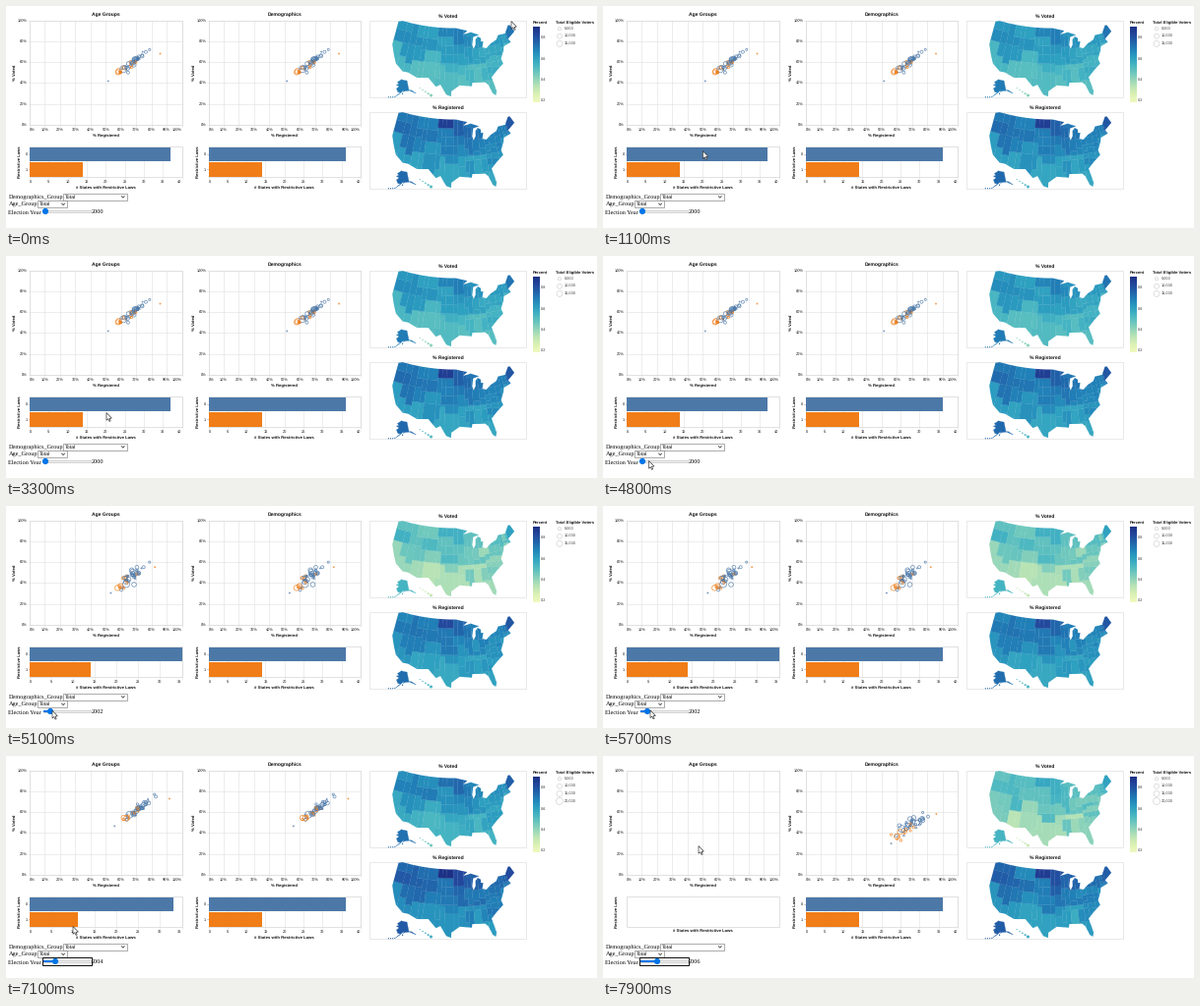
A matplotlib script that plays this animation: 600 px wide and 226 px high, repeating every 8 s.

```python
import numpy as np
import matplotlib.pyplot as plt
from matplotlib.animation import FuncAnimation
from matplotlib.collections import PolyCollection
from matplotlib.colors import LinearSegmentedColormap
from matplotlib.patches import Circle, Polygon, Rectangle
from matplotlib.path import Path

plt.rcParams["text.hinting"] = "none"
plt.rcParams["text.hinting_factor"] = 8

W, H, DPI = 600, 226, 64
PT = 72 / DPI
FRAMES, STEP = 80, 100
BLUE, ORANGE, GRID = "#4c78a8", "#f07d17", "#dddddd"
SANS, SERIF = "Liberation Sans", "Liberation Serif"

CMAP = LinearSegmentedColormap.from_list("ygb", [
    "#eff9bd", "#dbf1b4", "#bde5b5", "#94d5b9", "#69c5be", "#45b4c2",
    "#2c9ec0", "#2182b8", "#2163aa", "#23479c", "#1c3185"])
LOW, HIGH = 0.18, 0.90

# Map strips from west to east: western edge in degrees, then the states
# from south to north with the latitudes that part them.
STRIPS = [
    (125, "CA", 42, "OR", 46, "WA"),
    (120, "CA", 37.5, "NV", 42, "OR", 46, "WA"),
    (117, "CA", 35.5, "NV", 42, "ID"),
    (114, "AZ", 37, "UT", 42, "ID", 45, "MT"),
    (111, "AZ", 37, "UT", 41, "WY", 45, "MT"),
    (109, "NM", 37, "CO", 41, "WY", 45, "MT"),
    (104, "TX", 32, "NM", 37, "CO", 41, "NE", 43, "SD", 46, "ND"),
    (102, "TX", 36.5, "OK", 37, "KS", 40, "NE", 43, "SD", 46, "ND"),
    (100, "TX", 34, "OK", 37, "KS", 40, "NE", 43, "SD", 46, "ND"),
    (96.5, "TX", 34, "OK", 37, "KS", 40, "IA", 43.5, "MN"),
    (94.5, "LA", 33, "AR", 36.5, "MO", 40.5, "IA", 43.5, "MN"),
    (91.5, "LA", 31, "MS", 35, "AR", 36.5, "MO", 39, "IL", 42.5, "WI", 47, "MN"),
    (90, "MS", 35, "TN", 36.5, "KY", 37, "IL", 42.5, "WI", 46, "MI"),
    (88, "AL", 35, "TN", 36.5, "KY", 38, "IN", 41.8, "MI"),
    (85, "FL", 30.7, "GA", 35, "TN", 36.5, "KY", 38.8, "OH", 41.8, "MI"),
    (82.5, "FL", 30.7, "GA", 33, "SC", 35.2, "NC", 36.6, "VA", 37.5, "WV",
     39.5, "OH"),
    (80.5, "FL", 30.7, "SC", 34.8, "NC", 36.6, "VA", 38.5, "WV", 39.7, "PA",
     42, "NY"),
    (77.5, "NC", 36.6, "VA", 38.3, "MD", 39.7, "PA", 42, "NY"),
    (75, "NJ", 41, "NY"),
    (73.4, "CT", 42, "MA", 42.7, "VT"),
    (72, "RI", 42, "MA", 42.7, "NH"),
    (71, "MA", 42.9, "ME"),
]
STRICT = "ND GA FL TX AL IN SC TN VA LA SD MO CO AZ".split()

# Coast and border key points (degrees west, north), clockwise
NORTH = [122.8, 49, 95.2, 49, 89.6, 48, 92, 46.7, 88, 47.4, 84, 46.2, 87, 45.7,
         87.8, 43, 87.3, 41.7, 86.2, 43, 86, 44.8, 84.7, 45.7, 83.4, 45,
         83.6, 43.9, 82.5, 43.8, 83.3, 41.8, 81.5, 41.4, 79, 42.8, 76.3, 43.6,
         75, 45, 71.5, 45, 69.2, 47.4, 68.2, 47.3, 67, 44.8]
SOUTH = [70.8, 43, 70, 41.7, 73.6, 40.9, 74.1, 39.6, 76, 37, 75.5, 35.3,
         78, 33.9, 81.2, 31.5, 80.1, 26.5, 80.7, 25.2, 81.7, 26, 82.8, 29,
         84, 30.1, 89, 30.4, 89.3, 29.2, 94, 29.7, 97.2, 27.7, 97.3, 25.9,
         99.1, 26.5, 101.5, 29.8, 103.2, 29, 106.5, 31.8, 111, 31.3,
         114.8, 32.5, 117.1, 32.5, 120.6, 34.6, 122.4, 37.3, 124.3, 40.4,
         124.7, 48.4]
ALASKA = [141, 69.6, 141, 60.3, 136, 59.5, 130, 55.5, 139.5, 59.7, 148, 60,
          152, 59.2, 151, 61, 164.8, 54.6, 157.5, 58.7, 162, 58.7, 166, 62,
          161, 64.3, 168, 65.6, 162, 66.5, 166.5, 68.3, 156.5, 71.3]
SCALE, MAP_X, MAP_Y, MAP_GAP = 172, 454, 53.6, 93


def albers(points, mid, offset, lat0, p1, p2, scale, x0, y0):
    """Equal-area conic projection of (west, north) degrees to pixels."""
    p1, p2 = np.radians([p1, p2])
    n = (np.sin(p1) + np.sin(p2)) / 2
    c = np.cos(p1) ** 2 + 2 * n * np.sin(p1)

    def raw(dlon, lat):
        rho = np.sqrt(c - 2 * n * np.sin(np.radians(lat))) / n
        theta = n * np.radians(dlon)
        return rho * np.sin(theta), rho * np.cos(theta)

    points = np.asarray(points, float)
    x, y = raw(mid - points[:, 0], points[:, 1])
    cx, cy = raw(offset, lat0)
    return np.column_stack([x0 + scale * (x - cx), y0 + scale * (y - cy)])


def mainland(points):
    return albers(points, 96, -.6, 38.7, 29.5, 45.5, SCALE, MAP_X, MAP_Y)


def alaska(points):
    return albers(points, 154, -2, 58.5, 55, 65, .35 * SCALE,
                  MAP_X - .307 * SCALE, MAP_Y + .201 * SCALE)


def hawaii(points):
    return albers(points, 157, -3, 19.9, 8, 18, SCALE,
                  MAP_X - .205 * SCALE, MAP_Y + .212 * SCALE)


def dense(flat):
    """Closed outline with extra points on each edge, so it can curve."""
    p = np.reshape(flat, (-1, 2)).astype(float)
    return np.concatenate([a + (b - a) * np.linspace(0, 1, 7)[:-1, None]
                           for a, b in zip(p, np.roll(p, -1, axis=0))])


def blob(lon, lat, r):
    a = np.linspace(0, 2 * np.pi, 9)
    return np.column_stack([lon + 1.2 * r * np.cos(a), lat + r * np.sin(a)])


cells, owners = [], []
for strip, following in zip(STRIPS, STRIPS[1:] + [(66,)]):
    w, e = strip[0], following[0]
    edges = [24, *strip[2::2], 50]
    for name, s, n in zip(strip[1::2], edges, edges[1:]):
        cells.append((w, n, e, n, e, s, w, s))
        owners.append(name)
NAMES = sorted(set(owners)) + ["AK", "HI"]


def latitude(name):
    if name in ("AK", "HI"):
        return 48 if name == "AK" else 20
    return np.mean([np.clip([c[1], c[5]], 28, 49).mean()
                    for c, o in zip(cells, owners) if o == name])


# Survey figures: turnout rises with latitude, registration with turnout.
YEARS = [2000, 2002, 2004, 2006]
VOTE_MEAN = [.59, .455, .63, .465]
REG_MEAN = [.677, .665, .715, .685]
SCATTER = [.01, .026, .011, .03]
KEEN = {"ND": .04, "MN": .06, "ME": .04, "WI": .03}
SIZES = {"CA": 20, "TX": 13, "NY": 12, "FL": 11}

rng = np.random.default_rng(8)
COUNT = len(NAMES)
DEVIATION = (.008 * (np.array([latitude(n) for n in NAMES]) - 39.5)
             + rng.normal(0, .022, COUNT) + [KEEN.get(n, 0) for n in NAMES])
VOTERS = np.exp(rng.normal(.9, .7, COUNT)).clip(.4, 9)
VOTERS = np.array([SIZES.get(n, v) for n, v in zip(NAMES, VOTERS)])
VOTERS[[NAMES.index(n) for n in ("ND", "AK", "HI")]] = .5


def radius(millions):
    return .77 * np.sqrt(millions)


def survey(i):
    noise = np.random.default_rng(YEARS[i]).normal(0, 1, (2, COUNT))
    vote = VOTE_MEAN[i] + DEVIATION + noise[0] * SCATTER[i]
    reg = REG_MEAN[i] + .85 * DEVIATION + noise[1] * (.008 + SCATTER[i] / 2)
    reg[NAMES.index("ND")] += .1
    return vote, reg


fig = plt.figure(figsize=(W / DPI, H / DPI), dpi=DPI, facecolor="white")
ax = fig.add_axes([0, 0, 1, 1])
groups = [[] for _ in YEARS]


def text(x, y, s, size=3.85, ha="center", bold=False, font=SANS,
         color="#111111", rot=0):
    return ax.text(x, y, s, fontsize=size * PT, ha=ha, va="center",
                   family=font, color=color, rotation=rot, zorder=5,
                   weight="bold" if bold else "normal")


def line(xs, ys, color=GRID, width=.5, z=1):
    return ax.plot(xs, ys, color=color, lw=width * PT, zorder=z)[0]


def box(x0, y0, x1, y1, face="none", edge="none", width=.5, z=1):
    return ax.add_patch(Rectangle((x0, y0), x1 - x0, y1 - y0, fc=face,
                                  ec=edge, lw=width * PT, zorder=z))


def flush(i, last):
    return "left" if i == 0 else "right" if i == last else "center"


# Charts on the left
WIDTH, TOP, BASE = 154.5, 14.5, 121
BAR_TOP, BAR_BASE = 143, 174.3


def scatter_frame(x0, title):
    text(x0 + WIDTH / 2, 8.5, title, 5, bold=True)
    text(x0 + WIDTH / 2, 131.7, "% Registered", 4.3, bold=True)
    text(x0 - 15, 68, "% Voted", 4.3, bold=True, rot=90)
    for i in range(11):
        x = x0 + WIDTH * i / 10
        line([x, x], [TOP, BASE + 1.5])
        text(x, 126, f"{10 * i}%", ha=flush(i, 10))
    for i in range(6):
        y = BASE - (BASE - TOP) * i / 5
        line([x0 - 1.5, x0 + WIDTH], [y, y])
        text(x0 - 2.2, y, f"{20 * i}%", ha="right")
    box(x0, TOP, x0 + WIDTH, BASE, edge="#d4d4d4")


def points(x0, vote, reg, strict):
    colors = [ORANGE if n in strict else BLUE for n in NAMES]
    return ax.scatter(x0 + WIDTH * reg, BASE - (BASE - TOP) * vote,
                      s=(2 * radius(VOTERS) * PT) ** 2, facecolors="none",
                      edgecolors=colors, linewidths=.75 * PT, alpha=.8,
                      zorder=3)


def bar_title(x0, y=184.6):
    return text(x0 + WIDTH / 2, y, "# States with Restrictive Laws", 4.3,
                bold=True)


def bar_frame(x0):
    box(x0, BAR_TOP, x0 + WIDTH, BAR_BASE, edge="#c4c4c4")
    text(x0 - 10.5, 158.5, "Restrictive Laws", 4.1, bold=True, rot=90)


def bars(x0, counts, top):
    made = [bar_title(x0)]
    step = (BAR_BASE - BAR_TOP) / 2
    for i, (n, color) in enumerate(zip(counts, (BLUE, ORANGE))):
        mid = BAR_TOP + step * (i + .5)
        made += [box(x0, mid - .45 * step, x0 + WIDTH * n / top,
                     mid + .45 * step, color, z=2),
                 text(x0 - 2.4, mid, str(i), ha="right"),
                 line([x0 - 1.5, x0], [mid, mid], "#999999")]
    for v in range(0, top + 1, 5):
        x = x0 + WIDTH * v / top
        made += [line([x, x], [BAR_TOP, BAR_BASE + 1.3]),
                 text(x, 178.8, str(v), ha=flush(v, top))]
    return made


LEFT, RIGHT = 24, 205.5
LEFT_BARS = [((37, 14), 40), ((35, 14), 35), ((33, 11), 35), None]
for x0, title in ((LEFT, "Age Groups"), (RIGHT, "Demographics")):
    scatter_frame(x0, title)
    bar_frame(x0)
bars(RIGHT, (36, 14), 40)

# Maps
outline = mainland(dense(NORTH + SOUTH))
shapes = [mainland(dense(c)) for c in cells]
aleutians = [alaska(blob(166 + 3.3 * i, 53.8 - .6 * i, .5)) for i in range(4)]
north = [alaska(dense(ALASKA)), alaska(blob(153.5, 57.4, .7))] + aleutians
islands = [hawaii(blob(155.5 + i, 19.6 + .62 * i, .45 / (1 + .6 * i)))
           for i in range(5)]


def draw_map(values, dy):
    shades = CMAP((values - LOW) / (HIGH - LOW))
    color = dict(zip(NAMES, shades))
    layers = ((shapes, owners), (north, ["AK"] * len(north)),
              (islands, ["HI"] * len(islands)))
    made = []
    for polys, names in layers:
        made.append(PolyCollection(
            [p + (0, dy) for p in polys], facecolors=[color[n] for n in names],
            edgecolors="face", linewidths=.3, zorder=2))
        ax.add_collection(made[-1])
    made[0].set_clip_path(Path(outline + (0, dy)), ax.transData)
    return made


for title, y, dy in (("% Voted", 10.7, 0), ("% Registered", 103.5, MAP_GAP)):
    text(448.5, y, title, 5, bold=True)
    box(369, 15 + dy, 528, 93 + dy, edge="#d4d4d4")

# Legends
text(535, 17, "Percent", 4.15, "left", bold=True)
text(558, 17, "Total Eligible Voters", 4.15, "left", bold=True)
ax.imshow(np.linspace(1, 0, 128)[:, None], cmap=CMAP, aspect="auto",
          extent=(535, 541.5, 98.5, 21.5), zorder=2)
for v in (.8, .6, .4, .2):
    text(542.8, 98.5 - 77 * (v - LOW) / (HIGH - LOW), f"{v:.1f}", ha="left",
         color="#333333")


def size_legend(count):
    made = []
    for i in range(count):
        y, size = 23.2 + 7.6 * i, 5 * (i + 1)
        ring = Circle((562, y), radius(size), fc="none", ec="#c4c4c4",
                      lw=.5 * PT, zorder=2)
        made += [ax.add_patch(ring),
                 text(567, y, f"{size},000", ha="left", color="#333333")]
    return made


# Form controls
def control(y, label):
    text(2.5, y, label, 6.25, "left", font=SERIF, color="black")


def select(x0, x1, y):
    box(x0, y - 3.4, x1, y + 3.4, "white", "#777777", .6, 3)
    text(x0 + 1.6, y, "Total", 5.4, "left")
    line([x1 - 5.4, x1 - 3.9, x1 - 2.4], [y - .8, y + .8, y - .8],
         "#222222", .7, 5)


control(194.4, "Demographics_Group")
control(201.8, "Age_Group")
control(210, "Election Year")
select(57.8, 122.7, 194.4)
select(32, 62, 201.8)


def slider(i):
    knob = 40 + 5 * i
    made = [box(38, 207.8, 86, 210.2, "#efefef", "#b2b2b2", .5, 3),
            box(38, 207.8, knob, 210.2, "#0075e8", z=4),
            ax.add_patch(Circle((knob, 209), 3.1, fc="#0075e8", ec="none",
                                zorder=5)),
            text(87, 210, str(YEARS[i]), 6.25, "left", font=SERIF,
                 color="black")]
    if i >= 2:
        made.append(box(36.5, 205.4, 86.5, 212.7, edge="#111111", width=1, z=4))
    return made


for i, group in enumerate(groups):
    vote, reg = survey(i)
    group += draw_map(vote, 0) + draw_map(reg, MAP_GAP)
    group += size_legend(4 if i >= 2 else 3) + slider(i)
    group.append(points(RIGHT, vote, reg, STRICT))
    if LEFT_BARS[i]:
        counts, top = LEFT_BARS[i]
        group += bars(LEFT, counts, top)
        group.append(points(LEFT, vote, reg, STRICT[:counts[1]]))
    else:
        group.append(bar_title(LEFT, 178.2))

ARROW = np.array([(0, 0), (0, 7.8), (1.8, 6.2), (3, 8.9), (4.2, 8.4),
                  (3, 5.8), (5.4, 5.6)])
cursor = ax.add_patch(Polygon(ARROW, fc="white", ec="#222222", lw=.6 * PT,
                              zorder=9))

# Pointer stops: time, x, y
PATH = np.array([
    (0, 513, 15.5), (900, 133, 136), (1400, 54, 165), (2200, 72, 124.5),
    (2700, 68, 190), (3000, 102, 159.5), (3300, 102, 159.5), (4200, 42, 207),
    (4800, 46.5, 208.5), (6300, 49, 207.5), (7100, 68, 173.5),
    (7900, 97, 91.5)])
SWITCH = [5000, 6300, 7500]

ax.set_xlim(0, W)
ax.set_ylim(H, 0)
ax.axis("off")


def update(frame):
    t = frame * STEP
    shown = sum(t >= s for s in SWITCH)
    for i, group in enumerate(groups):
        for artist in group:
            artist.set_visible(i == shown)
    cursor.set_xy(ARROW + [np.interp(t, PATH[:, 0], PATH[:, k])
                           for k in (1, 2)])
    return [cursor]


anim = FuncAnimation(fig, update, frames=FRAMES, interval=STEP, repeat=True,
                     repeat_delay=0, blit=False)
plt.show()
```
